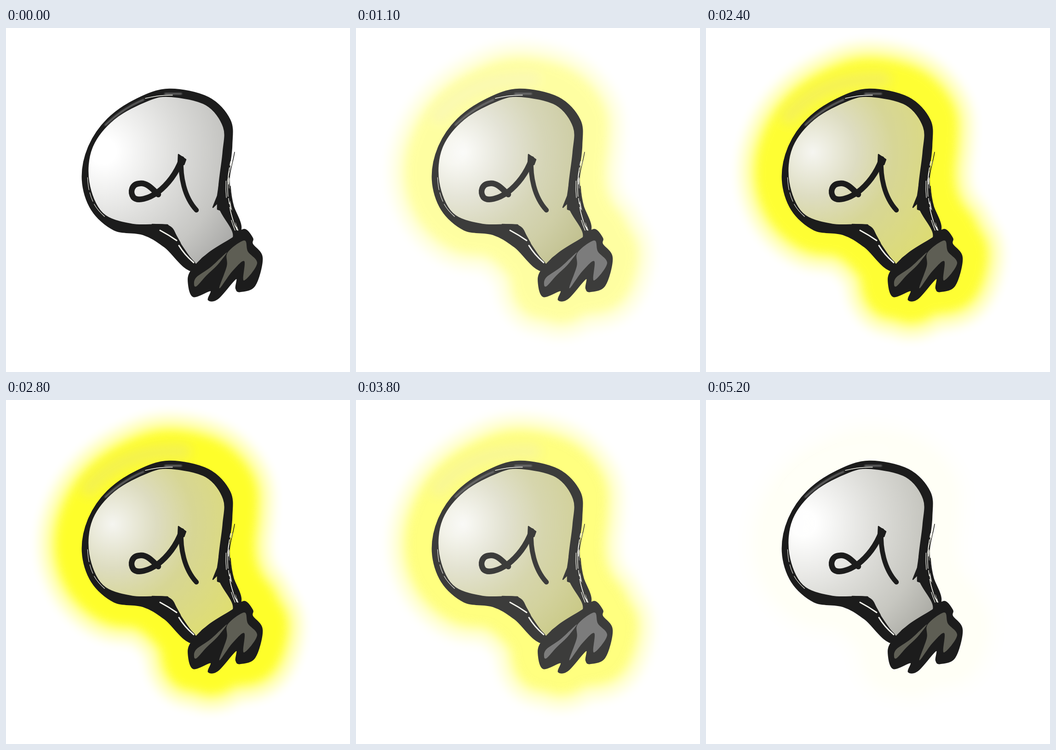
Write an HTML page that moves like this. It is 748 px wide and 748 px high and loops after 5.3 s.

```html
<!DOCTYPE html>
<html lang="en">
<head>
<meta charset="utf-8">
<title>Light bulb</title>
<style>
  html, body { margin: 0; width: 100%; height: 100%; overflow: hidden; background: #fff; }
  svg { display: block; width: 100vw; height: 100vh; --ink: #1c1c1c; --cap: #5e5e54; }
  path { stroke-linecap: round; stroke-linejoin: round; }
  .ink { fill: var(--ink); stroke: var(--ink); stroke-width: 2.5; }
  .line { fill: none; stroke: var(--ink); }
  .cap { fill: var(--cap); }
  .slit { fill: none; stroke: #f4f4ec; }
  .glow { fill: #fdfd00; stroke: #fdfd00; }
</style>
</head>
<body>
<svg id="stage" viewBox="0 0 748 748" xmlns="http://www.w3.org/2000/svg">
  <defs>
    <radialGradient id="off" gradientUnits="userSpaceOnUse" cx="212" cy="268" r="340">
      <stop offset=".08" stop-color="#fff"/>
      <stop offset=".46" stop-color="#dededc"/>
      <stop offset=".76" stop-color="#c6c6c3"/>
      <stop offset="1" stop-color="#a9a9a7"/>
    </radialGradient>
    <radialGradient id="on" gradientUnits="userSpaceOnUse" cx="232" cy="270" r="320">
      <stop offset="0" stop-color="#f5f5f0"/>
      <stop offset=".3" stop-color="#dddcc0"/>
      <stop offset=".55" stop-color="#d7d694"/>
      <stop offset="1" stop-color="#dfde70"/>
    </radialGradient>
    <filter id="soft" filterUnits="userSpaceOnUse" x="-60" y="-60" width="870" height="870">
      <feGaussianBlur stdDeviation="12"/>
    </filter>
    <filter id="brush" filterUnits="userSpaceOnUse" x="180" y="110" width="240" height="120">
      <feGaussianBlur stdDeviation="1.5"/>
    </filter>
  </defs>

  <g id="glow" opacity="0">
    <g id="aura" filter="url(#soft)" transform="translate(-2 -10)"></g>
    <path filter="url(#soft)" fill="none" stroke="#f0ec40" stroke-width="36" opacity=".8"
      d="M180 192C225 140 290 108 385 112"/>
  </g>

  <path id="back" fill="url(#off)"/>
  <path id="lit" fill="url(#on)" opacity="0"/>
  <path id="rim" class="ink" fill-rule="evenodd"/>

  <!-- ragged neck -->
  <path class="ink" d="M318 427L351 428L364 441L378 466L384 483L410 510L404 517L372 490Z"/>
  <path class="ink" d="M466 325L460 365L450 390L460 380V394L478 400V330Z"/>
  <path class="slit" stroke-width="3" d="M335 440Q354 450 371 462M376 473Q388 493 408 510"/>
  <path class="line" stroke-width="1.5" d="M497 270C494 290 487 308 486 326M488 344C490 385 503 412 511 433"/>
  <g id="hairs"></g>

  <!-- worn brush on top -->
  <path filter="url(#brush)" fill="none" stroke="#8a8a8a" stroke-width="3.5" opacity=".75"
    d="M216 211Q255 174 299 156M346 143H381"/>
  <path class="slit" stroke-width="1.5" d="M303 153Q335 145 362 146"/>

  <!-- filament -->
  <path class="line" stroke-width="12.5" d="M331 362C318 350 307 336 291 338C273 339 269 357 277 368C286 378 310 371 330 357C351 341 371 316 382 285"/>
  <path class="line" stroke-width="10.5" d="M381 287C379 321 387 367 414 396"/>
  <path class="ink" d="M375 275L391 286L387 297L374 296Z"/>

  <path id="screw" class="ink"/>
  <path id="shine1" class="cap"/>
  <path id="shine2" class="cap"/>
</svg>
<script>
const $ = id => document.getElementById(id);

function add(parent, attrs) {
  const el = document.createElementNS('http://www.w3.org/2000/svg', 'path');
  for (const k in attrs) el.setAttribute(k, attrs[k]);
  $(parent).append(el);
}

// closed smooth curve through "x,y x,y ..."
function loop(text) {
  const p = text.split(' ').map(s => s.split(',').map(Number));
  const at = i => p[(i + p.length) % p.length];
  const ctl = (i, s) => [0, 1].map(k => at(i)[k] + s * (at(i + 1)[k] - at(i - 1)[k]) / 6);
  return 'M' + p[0] + p.map((_, i) => `C${ctl(i, 1)} ${ctl(i + 1, -1)} ${at(i + 1)}`).join('') + 'Z';
}

const outer = loop('355,133 440,151 487,200 491,255 485,320 491,378 511,434 490,470 410,529 345,476 298,449 235,439 186,395 166,330 179,260 221,198 285,154');
const glass = loop('360,149 435,167 473,215 472,270 463,345 465,393 494,456 430,498 413,514 376,465 352,430 275,427 210,403 180,335 187,260 235,198 310,157');
const screw = loop('518,438 536,457 536,470 557,500 541,560 509,573 500,566 500,545 461,588 440,591 445,571 408,584 397,557 402,529 440,490 492,457');

const shapes = {
  rim: outer + glass, back: glass, lit: glass, screw,
  shine1: loop('409,558 414,542 445,520 480,488 460,515 436,538 415,561'),
  shine2: loop('482,488 518,462 526,486 546,512 517,549 518,507 492,529 464,566 480,518')
};
for (const id in shapes) $(id).setAttribute('d', shapes[id]);

// the glow is the silhouette grown twice: wide and faint, then tight and strong
for (const [grow, opacity] of [[90, .3], [60, .95]])
  add('aura', { class: 'glow', d: outer + screw, 'stroke-width': grow * 2, opacity });

// dry-brush hairs: shifted copies of a stroke with random dashes
let seed = 7;
const rnd = (a, b) => a + (b - a) * (seed = seed * 16807 % 2147483647) / 2147483647;
function hairs(d, count, spread) {
  for (let i = 0; i < count; i++)
    add('hairs', {
      class: 'slit', d, 'stroke-width': rnd(.8, 1.6),
      transform: `translate(${rnd(-spread, spread)} 0)`,
      'stroke-dasharray': `${rnd(10, 45)} ${rnd(20, 60)}`, 'stroke-dashoffset': rnd(0, 80)
    });
}
hairs('M487 290C475 340 478 385 500 440', 6, 6);
hairs('M178 325C180 365 190 388 215 410', 2, 2);

const PERIOD = 5300, STEP = 100, PEAK = .92;
const start = performance.now();

function draw() {
  const t = Math.floor((performance.now() - start) % PERIOD / STEP) * STEP;
  const away = Math.abs(2 * t / PERIOD - 1);
  const v = PEAK * (1 - away);
  const pale = away > .23 && away < .75;
  $('glow').setAttribute('opacity', v);
  $('lit').setAttribute('opacity', Math.min(1, v * 1.15));
  $('stage').style.setProperty('--ink', pale ? '#3c3c3b' : '#1c1c1c');
  $('stage').style.setProperty('--cap', pale ? '#7c7c7c' : '#5e5e54');
  requestAnimationFrame(draw);
}
draw();
</script>
</body>
</html>
```
